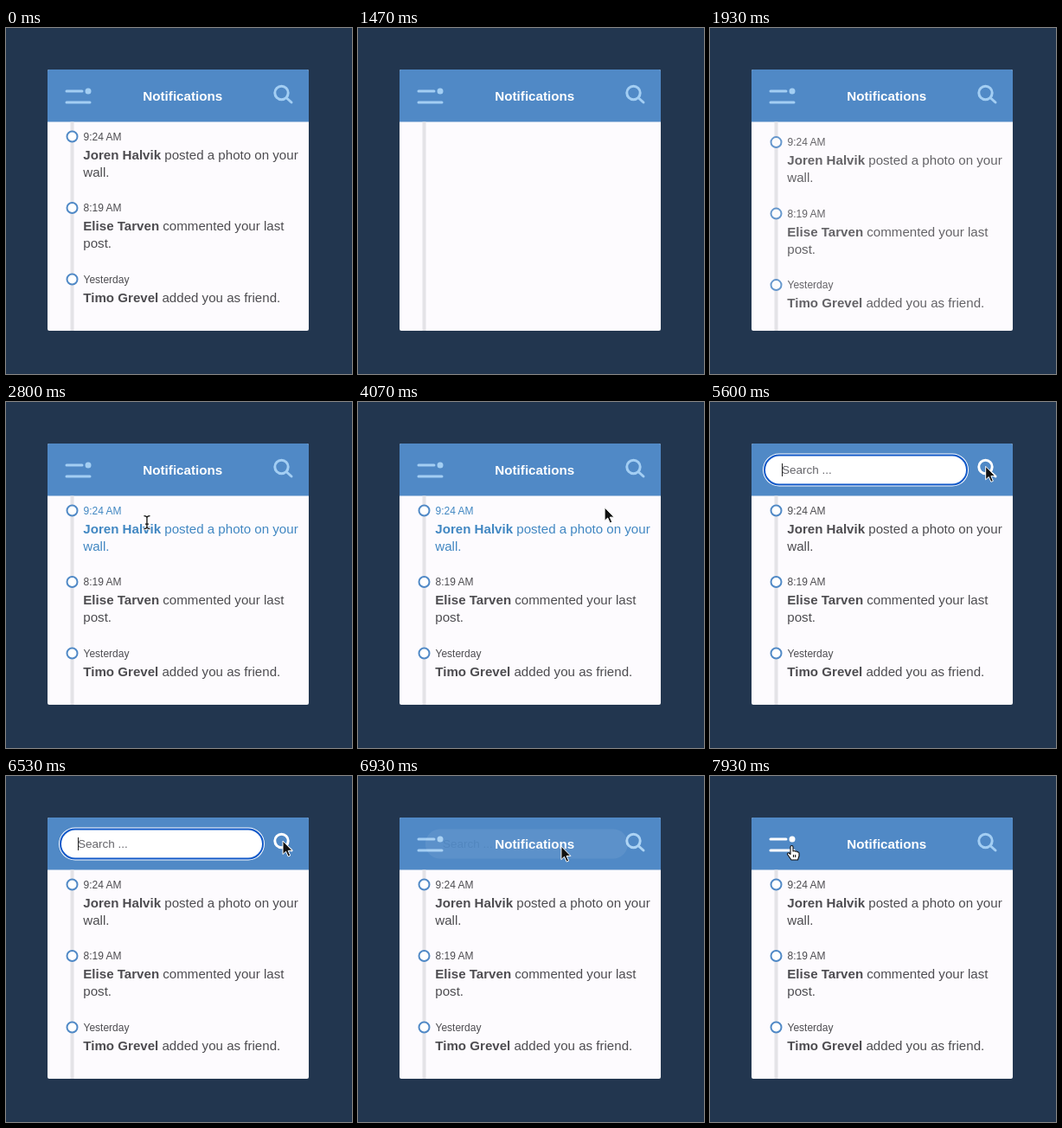
These frames come from a looping animation (400x400 px, 8000 ms). An HTML page:

```html
<!DOCTYPE html>
<html lang="en">
<head>
<meta charset="utf-8">
<style>
  html, body { margin: 0; height: 100%; overflow: hidden; background: #22364f; }
  svg { display: block; width: 100vw; height: 100vh; }
  text { font-family: "Liberation Sans", Arial, sans-serif; }
  .item { font-size: 15.1px; fill: #4d4c50; }
  .time { font-size: 12px; }
  .bold { font-weight: bold; }
  .icon { fill: none; stroke-width: 3; stroke-linecap: round; }
</style>
</head>
<body>
<svg viewBox="0 0 400 400">
  <clipPath id="body"><rect x="48" y="108" width="302" height="242"/></clipPath>
  <rect x="48" y="48" width="302" height="302" rx="2" fill="#fdfbfe"/>
  <path d="M48 108.500V50a2 2 0 0 1 2-2H348a2 2 0 0 1 2 2V108.500Z" fill="#5089c6"/>
  <rect x="74.500" y="108.500" width="4" height="241.500" fill="#e4e3e7"/>
  <g clip-path="url(#body)"><g id="list"></g></g>

  <g id="menu" class="icon">
    <path d="M70 73H88M70 86H97"/>
    <circle cx="95" cy="73" r="2"/>
  </g>
  <text x="158.300" y="83.500" class="bold" font-size="15.200" fill="#fff">Notifications</text>
  <g id="lens" class="icon">
    <circle cx="318.500" cy="75" r="7.700"/>
    <path d="M324.500 81L330 86"/>
  </g>

  <g id="field">
    <rect id="halo" x="61" y="59.500" width="238" height="38" rx="19" fill="#fff"/>
    <rect id="box" x="63" y="61.500" width="234" height="34" rx="17" fill="#fff" stroke="#1058c8"/>
    <text x="83" y="83" font-size="13.500" fill="#66666b">Search ...</text>
    <path id="caret" d="M83.500 71V86" stroke="#222"/>
  </g>

  <g id="cursor">
    <path id="arrow" d="M0 0V15.500L3.600 12.200L6.200 18L8.700 17L6.200 11.300H11Z" fill="#111" stroke="#fff"/>
    <g id="beam" fill="none">
      <path id="beamShape" d="M-3.500-7.500Q0-7.500 0-5Q0-7.500 3.500-7.500M0-5.500V5.500M-3.500 7.500Q0 7.500 0 5Q0 7.500 3.500 7.500M-2 2H2" stroke="#fff" stroke-width="3"/>
      <use href="#beamShape" id="beamCore"/>
      <path d="M-3.500-7.500Q0-7.500 0-5Q0-7.500 3.500-7.500M0-5.500V5.500M-3.500 7.500Q0 7.500 0 5Q0 7.500 3.500 7.500M-2 2H2" stroke="#111" stroke-width="1.300"/>
    </g>
    <path id="hand" d="M-1.500 1.200Q-1.500-.5 0-.5T1.500 1.200V6Q3 4.800 4.200 6.300Q5.800 5.500 6.500 7Q8.500 6.500 8.500 8.500V11.500L7 16H-.5L-5 9.500Q-5 7.500-3.200 8L-1.500 9.500ZM2 10V13M4.200 10V13" fill="#fff" stroke="#111" stroke-width="1.100" stroke-linejoin="round"/>
  </g>
</svg>
<script>
const LOOP = 8000;
const $ = id => document.getElementById(id);
const show = (id, on) => $(id).style.display = on ? '' : 'none';
const clamp = v => Math.max(0, Math.min(1, v));
const progress = (t, start, length) => clamp((t - start) / length);

// cubic-bezier(.25, .1, .25, 1)
function ease(x) {
  const bezier = (s, a, b) => 3 * s * (1 - s) ** 2 * a + 3 * s * s * (1 - s) * b + s ** 3;
  let lo = 0, hi = 1;
  for (let i = 0; i < 20; i++) {
    const mid = (lo + hi) / 2;
    if (bezier(mid, .25, .25) < x) lo = mid; else hi = mid;
  }
  return x >= 1 ? 1 : bezier(lo, .1, 1);
}

const mix = (from, to, k) =>
  `rgb(${from.map((v, i) => Math.round(v + (to[i] - v) * k))})`;
const PALE = [163, 206, 243], WHITE = [255, 255, 255];
const INK = [77, 76, 80], BLUE = [65, 135, 194];

const items = [
  [125.5, '9:24 AM', 'Joren Halvik', 'posted a photo on your', 'wall.'],
  [208, '8:19 AM', 'Elise Tarven', 'commented your last', 'post.'],
  [290.5, 'Yesterday', 'Timo Grevel', 'added you as friend.', '']
];
$('list').innerHTML = items.map(([y, time, name, action, rest], i) => `
  <circle cx="76.500" cy="${y}" r="6" fill="#fff" stroke="#5089c6" stroke-width="2"/>
  <g class="item" id="item${i}">
    <text x="89.500" y="${y + 4}" class="time">${time}</text>
    <text x="89.300" y="${y + 26}"><tspan class="bold">${name}</tspan> ${action}</text>
    <text x="89.300" y="${y + 46.3}">${rest}</text>
  </g>`).join('');
$('beamCore').remove();

// time, x, y of the pointer
const path = [
  [2130, 333, 40], [2270, 320, 34], [2600, 200, 125], [2800, 163, 139],
  [3070, 151, 147], [3600, 157, 146], [3800, 157, 146], [4070, 285, 122],
  [4400, 316, 73], [5400, 316, 73], [5700, 320, 75], [6720, 320, 75],
  [7030, 195, 84], [7130, 182, 81], [7330, 182, 81], [7670, 94.5, 81]
];
function pointerAt(t) {
  const next = path.findIndex(p => p[0] > t);
  if (next < 0) return path[path.length - 1].slice(1);
  const [a, b] = [path[Math.max(0, next - 1)], path[next]];
  const k = progress(t, a[0], b[0] - a[0] || 1);
  return [a[1] + (b[1] - a[1]) * k, a[2] + (b[2] - a[2]) * k];
}

function draw(t) {
  const entry = t < 1400 ? 1 : ease(progress(t, 1470, 800));
  $('list').setAttribute('transform', `translate(0 ${50 * (1 - entry)})`);
  $('list').style.opacity = entry;

  const hover = progress(t, 2560, 150) - progress(t, 4200, 150);
  $('item0').style.fill = mix(INK, BLUE, hover);
  $('lens').style.stroke = mix(PALE, WHITE, progress(t, 4400, 200) - progress(t, 6750, 200));
  const menuColor = mix(PALE, WHITE, progress(t, 7540, 130));
  $('menu').style.stroke = menuColor;
  $('menu').style.fill = menuColor;

  const open = ease(progress(t, 4670, 380)) - ease(progress(t, 6700, 340));
  const focused = t >= 5400 && t < 6700;
  $('field').style.opacity = open;
  $('field').setAttribute('transform', `translate(${16 * (1 - open)} 0)`);
  $('box').style.strokeWidth = focused ? 2 : 0;
  show('halo', focused);
  show('caret', focused && (t - 5400) % 1000 < 500);

  const [x, y] = pointerAt(t);
  const beam = t >= 2560 && t < 3930, hand = t >= 7600;
  show('cursor', t >= 2130);
  show('beam', beam);
  show('hand', hand);
  show('arrow', !beam && !hand);
  $('cursor').setAttribute('transform', `translate(${x} ${y})`);
}

function tick() {
  draw(performance.now() % LOOP);
  requestAnimationFrame(tick);
}
tick();
</script>
</body>
</html>
```
